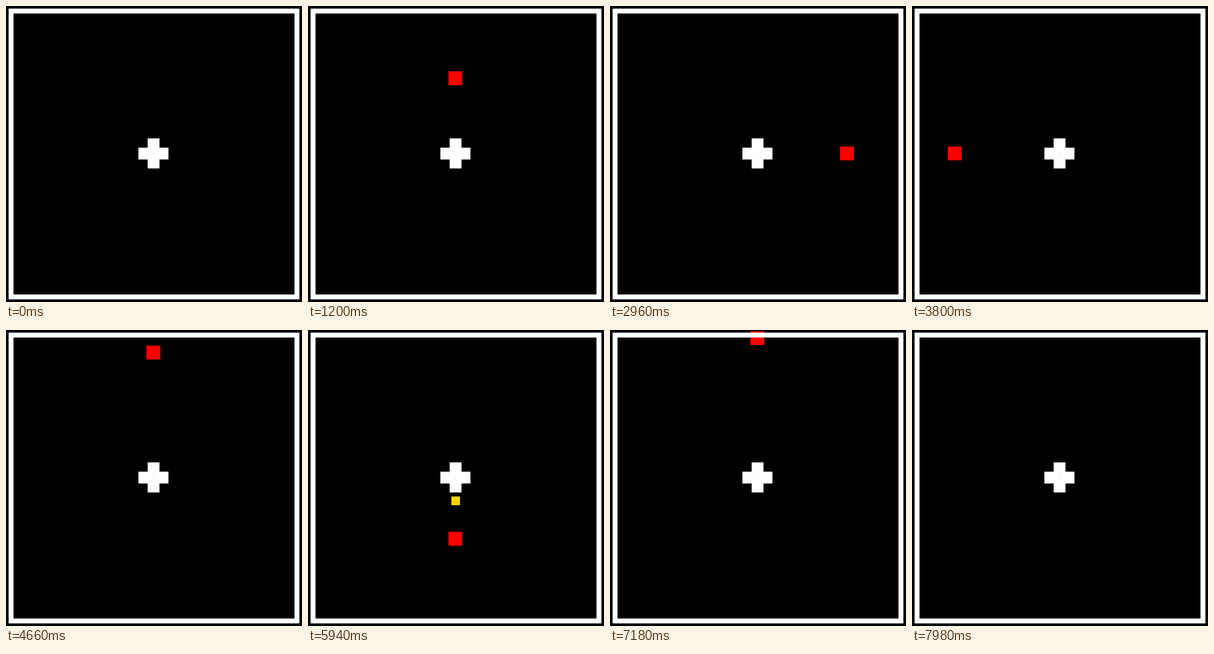
Recreate the animation shown at these times as an HTML page with a canvas. Size 512 px wide and 512 px high, loop 8 s.

```html
<!DOCTYPE html>
<html lang="en">
<head>
<meta charset="utf-8">
<title>Block the squares</title>
<style>
  html, body { margin: 0; width: 100%; height: 100%; overflow: hidden; background: #000; }
  canvas { display: block; width: 512px; height: 512px; }
</style>
</head>
<body>
<canvas id="stage" width="512" height="512"></canvas>
<script>
const ctx = document.getElementById('stage').getContext('2d');
const LOOP = 8000, TICK = 20;
const CENTER = 255;
const ENEMY_SIZE = 24, SHIELD_SIZE = 15;
const SHIELD_DISTANCE = 40, BLOCK_DISTANCE = 58;
const SHIELD_TIME = 220;

const UP = [0, -1], DOWN = [0, 1], LEFT = [-1, 0], RIGHT = [1, 0];

// Side of approach, time of the block in ms, speed in px per ms
const enemies = [
  { side: UP,    blockedAt: 1704, speed: 0.1425 },
  { side: RIGHT, blockedAt: 2280, speed: 0.428 },
  { side: RIGHT, blockedAt: 3380, speed: 0.23 },
  { side: LEFT,  blockedAt: 4420, speed: 0.1984 },
  { side: UP,    blockedAt: 5200, speed: 0.293 },
  { side: DOWN,  blockedAt: 6120, speed: 0.267 },
  { side: DOWN,  blockedAt: 7030, speed: 0.235 },
  { side: UP,    blockedAt: 7960, speed: 0.2346 }
];

function rect(color, x, y, w, h) {
  ctx.fillStyle = color;
  ctx.fillRect(x, y, w, h);
}

function square(color, size, [dx, dy], distance) {
  const corner = CENTER - size / 2;
  rect(color, Math.round(corner + dx * distance), Math.round(corner + dy * distance), size, size);
}

function drawBorder() {
  ctx.strokeStyle = '#fff';
  ctx.lineWidth = 8.5;
  ctx.strokeRect(8.75, 8.75, 494.5, 494.5);
}

function drawPlayer() {
  rect('#fff', 229, 245, 52, 20.5);
  rect('#fff', 245, 229, 20.5, 52);
  rect('#999', 255, 255, 1, 1);
}

function draw(time) {
  rect('#000', 0, 0, 512, 512);
  for (const { side, blockedAt, speed } of enemies) {
    const left = blockedAt - time;
    const distance = BLOCK_DISTANCE + speed * left;
    if (left <= 0 || distance > 270) continue;
    square('#f00', ENEMY_SIZE, side, distance);
    if (left <= SHIELD_TIME) square('#ffd700', SHIELD_SIZE, side, SHIELD_DISTANCE);
  }
  drawBorder();
  drawPlayer();
}

function frame() {
  const time = performance.now() % LOOP;
  draw(Math.floor(time / TICK) * TICK);
  requestAnimationFrame(frame);
}
frame();
</script>
</body>
</html>
```
